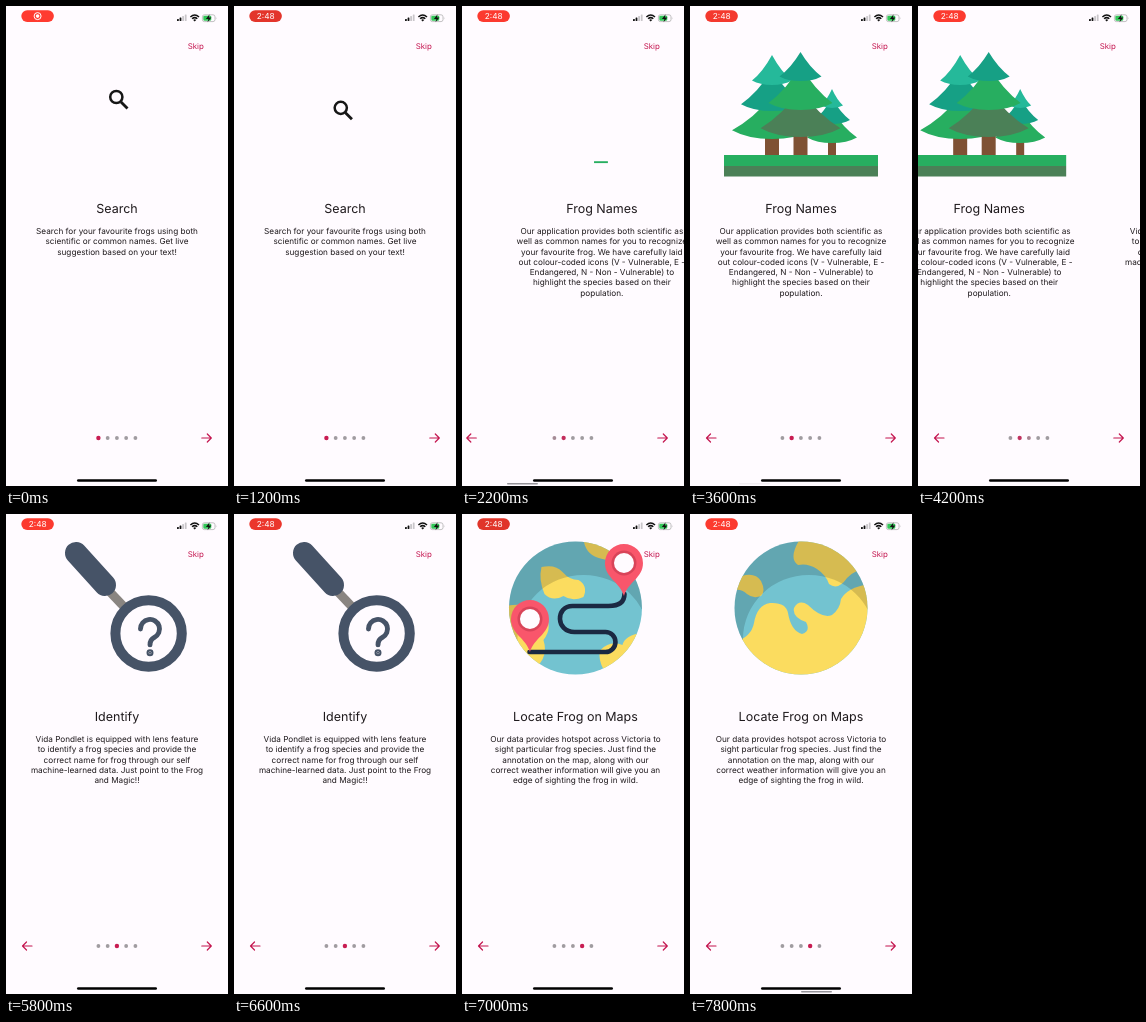
An HTML page for the animation above (8 s loop, 222 by 480 pixels).

```html
<!DOCTYPE html>
<html lang="en">
<head>
<meta charset="utf-8">
<title>Onboarding</title>
<style>
  html, body { margin: 0; width: 100%; height: 100%; overflow: hidden; background: #fffbff; }
  svg { display: block; width: 222px; height: 480px; }
  text { font-family: Inter, Roboto, sans-serif; text-anchor: middle; fill: #1f1a1d; text-rendering: geometricPrecision; }
  .title { font-size: 12.5px; }
  .body { font-size: 8.2px; }
  .line { fill: none; stroke-linecap: round; stroke-linejoin: round; }
  .arrow { stroke: #c4154f; stroke-width: 1.2; }
</style>
</head>
<body>
<svg id="stage" viewBox="0 0 222 480"></svg>
<script>
const LOOP = 8000, WIDTH = 222, SLIDE = 305;
const slides = [1920, 4090, 6698];
const thumbSpans = [[2030, 3400], [4200, 5570], [7040, 8400]];

const pages = [
  ['Search', 'Search for your favourite frogs using both|scientific or common names. Get live|suggestion based on your text!'],
  ['Frog Names', 'Our application provides both scientific as|well as common names for you to recognize|your favourite frog. We have carefully laid|out colour-coded icons (V - Vulnerable, E -|Endangered, N - Non - Vulnerable) to|highlight the species based on their|population.'],
  ['Identify', 'Vida Pondlet is equipped with lens feature|to identify a frog species and provide the|correct name for frog through our self|machine-learned data. Just point to the Frog|and Magic!!'],
  ['Locate Frog on Maps', 'Our data provides hotspot across Victoria to|sight particular frog species. Just find the|annotation on the map, along with our|correct weather information will give you an|edge of sighting the frog in wild.']
];

const clamp = v => Math.min(1, Math.max(0, v));
const ramp = (t, from, to) => clamp((t - from) / (to - from));
const smooth = k => k * k * (3 - 2 * k);
const mix = (a, b, k) => a + (b - a) * k;
const backOut = k => 1 + 2.2 * (k - 1) ** 3 + 1.2 * (k - 1) ** 2;
const scaleAt = (x, y, sx, sy = sx) => `translate(${x} ${y}) scale(${sx} ${sy}) translate(${-x} ${-y})`;

// A branch tier: pointed top, slightly hollow sides and a rounded hem.
const tier = (x, top, half, hem, color) => {
  const corner = hem - half * .22;
  return `<path fill="${color}" d="M${x} ${top}Q${x + half * .45} ${mix(top, corner, .65)} ${x + half} ${corner}
    Q${x + half * .6} ${hem} ${x} ${hem}Q${x - half * .6} ${hem} ${x - half} ${corner}
    Q${x - half * .45} ${mix(top, corner, .65)} ${x} ${top}"/>`;
};
const MINT = '#25b99a', TEAL = '#16a085', GREEN = '#27ae60', MOSS = '#4b8057';
const tree = (id, x, trunk, tiers) =>
  `<g id="${id}"><rect x="${x - trunk / 2}" y="124" width="${trunk}" height="26" fill="#7f5134"/>
  ${tiers.map(p => tier(x, ...p)).join('')}</g>`;

const pin = (id, x, y) => `<g id="${id}">
  <path fill="#f9566b" d="M${x} ${y}C${x - 4} ${y - 14} ${x - 19} ${y - 18} ${x - 19} ${y - 33}
    a19 19 0 0 1 38 0C${x + 19} ${y - 18} ${x + 4} ${y - 14} ${x} ${y}"/>
  <circle cx="${x}" cy="${y - 33}" r="12.5" fill="#d94459"/><circle cx="${x}" cy="${y - 33}" r="10" fill="#fffbff"/></g>`;

const art = [
  `<g id="search" class="line" stroke="#161616">
    <circle cx="110.3" cy="91" r="6.1" stroke-width="2.5"/><path d="M115 96L121.5 102.5" stroke-width="2.8" stroke-linecap="butt"/></g>`,

  tree('treeLeft', 82, 14, [[90, 40, 133, GREEN], [64, 31, 105, TEAL], [49, 20, 79, MINT]]) +
  tree('treeRight', 142, 8, [[104, 25, 137, GREEN], [92, 18, 118, TEAL], [83, 11, 102, MINT]]) +
  tree('treeMid', 110.5, 14, [[84, 40, 131, MOSS], [60, 32, 104, GREEN], [46, 21, 75, TEAL]]) +
  `<g id="ground"><rect x="34" y="149" width="154" height="11" fill="${GREEN}"/>
    <rect id="soil" x="34" y="160" width="154" height="10.5" fill="${MOSS}"/></g>`,

  `<g id="lens" class="line" stroke="#465367">
    <path d="M104 78L122 97" stroke="#8a8581" stroke-width="9"/><path id="handle"/>
    <circle cx="142.6" cy="119.5" r="33.2" stroke-width="10" fill="#fffbff"/>
    <g id="question"><path d="M-9 -8A9 9 0 1 1 4 0Q0 2 0 7"/><circle cy="14.5" r="1" fill="#465367"/></g></g>`,

  `<clipPath id="globeClip"><circle cx="111" cy="94" r="66.5"/></clipPath>
  <g clip-path="url(#globeClip)">
    <rect x="40" y="25" width="140" height="140" fill="#73c3d0"/>
    <g id="lands" fill="#fbdc5f">
      <g transform="translate(-150 0)">
        <path d="M77 53Q91 50 98 58T114 66Q124 72 119 83Q108 88 99 82Q88 88 80 80Q74 66 77 53"/>
        <path d="M40 92Q65 88 78 98Q90 112 79 126Q84 142 72 153L40 165Z"/>
        <path d="M180 118Q160 121 158 131Q146 126 136 136Q132 147 144 163L180 165Z"/>
        <path d="M119 25Q121 42 138 45T160 53L180 50V25Z"/>
      </g>
      <path d="M52 62Q65 58 71 67Q76 77 71 82Q63 85 57 80T46 76Z"/>
      <path d="M110 25Q98 44 108 51Q118 49 127 55T139 70Q148 77 157 64Q165 55 180 55V25Z"/>
      <path d="M40 129Q61 125 64 109Q67 91 80 89Q96 88 98 99Q101 117 112 120Q121 117 116 108Q102 103 104 94Q109 85 118 91Q132 105 142 101Q150 95 151 85Q158 73 180 70V165H40Z"/>
    </g>
    <path fill="#000" opacity=".15" fill-rule="evenodd" d="M40 25H182V165H40ZM53 125a66 64 0 1 0 132 0a66 64 0 1 0 -132 0"/>
  </g>
  <g id="route"><path class="line" stroke="#1b2942" stroke-width="4.6"
    d="M65 138H141A10 10 0 0 0 141 118H110C91 118 91 92 108 92H144Q160 92 160 80"/>
    ${pin('pinA', 65.5, 138)}${pin('pinB', 159.5, 82)}</g>`
];

const pageMarkup = ([title, body], i) => `<g id="page${i}">${art[i]}
  <text class="title" x="111" y="206.5">${title}</text>
  ${body.split('|').map((s, n) => `<text class="body" x="111" y="${228 + n * 10.25}">${s}</text>`).join('')}</g>`;

const statusBar = `
  <rect id="pill" x="15.3" y="4.2" width="32.6" height="11.8" rx="5.9"/>
  <g id="record" fill="none" stroke="#fff"><circle cx="31.6" cy="10.1" r="3.5"/><circle cx="31.6" cy="10.1" r="1.8" fill="#fff" stroke="none"/></g>
  <text id="clock" x="31.8" y="13.1" font-size="8.3" style="fill:#fff">2:48</text>
  ${[0, 1, 2, 3].map(i => `<rect x="${171 + i * 2.6}" y="${12.9 - i * 1.5}" width="1.8" height="${2.2 + i * 1.5}" rx=".5" fill="${i < 2 ? '#111' : '#c9c6ca'}"/>`).join('')}
  <g fill="none" stroke="#111" stroke-width="1.5"><path d="M184.4 11Q188.7 6.9 193 11M186.1 12.8Q188.7 10.4 191.3 12.8"/></g>
  <path d="M187.2 13.9Q188.7 12.6 190.2 13.9L188.7 15.4Z" fill="#111"/>
  <rect x="196.4" y="8.8" width="12.6" height="6.8" rx="2" fill="none" stroke="#aaa" stroke-width=".7"/>
  <rect x="197.3" y="9.7" width="8" height="5" rx="1.1" fill="#34c759"/>
  <path d="M209.9 11q1 1.2 0 2.4z" fill="#aaa"/>
  <path d="M203.6 8.2L199.9 12.9H202.4L201.5 16.2L205.4 11.4H202.8Z" fill="#111"/>`;

const controls = `
  <text x="189.8" y="42.6" font-size="7.9" style="fill:#c4154f">Skip</text>
  <path id="back" class="line arrow" d="M26 432H16.5M20.5 428L16.5 432L20.5 436"/>
  <path class="line arrow" d="M195.8 432H205.3M201.3 428L205.3 432L201.3 436"/>
  ${[0, 1, 2, 3, 4].map(i => `<circle id="dot${i}" cx="${92.4 + i * 9.25}" cy="432"/>`).join('')}
  <rect id="thumb" y="477" width="31" height="1.6" rx=".8" fill="#949298"/>
  <rect x="71" y="473.2" width="80" height="2.6" rx="1.3" fill="#000"/>`;

const stage = document.getElementById('stage');
stage.innerHTML = pages.map(pageMarkup).join('') + statusBar + controls;
const parts = Object.fromEntries([...stage.querySelectorAll('[id]')].map(el => [el.id, el]));
const set = (id, attrs) => {
  for (const name in attrs) parts[id].setAttribute(name, attrs[name]);
};

function drawStatus(t) {
  const dim = .94 + .06 * Math.cos(t * Math.PI / 1000);
  set('pill', { fill: `rgb(${255 * dim},${59 * dim},${48 * dim})` });
  set('record', { opacity: 1 - ramp(t, 700, 900) });
  set('clock', { opacity: ramp(t, 800, 1000) });
}

function drawControls(t, page) {
  set('back', { transform: `translate(${-90 * (1 - clamp(page))} 0)`, opacity: page > .5 ? 1 : 0 });
  for (let i = 0; i < 5; i++) {
    const on = clamp(1 - Math.abs(page - i));
    set('dot' + i, { r: 1.9 + .3 * on, fill: `rgb(${mix(160, 200, on)},${mix(156, 28, on)},${mix(160, 82, on)})` });
  }
  const opacity = Math.max(...thumbSpans.map(([from, to]) => ramp(t, from, from + 150) * (1 - ramp(t, to, to + 230))));
  set('thumb', { x: 18 + 31 * page, opacity });
}

function drawSearch(t) {
  const turn = t * Math.PI / 1000;
  set('search', { transform: `translate(${6 * Math.sin(turn)} ${6 * (1 - Math.cos(turn))})` });
}

function drawTrees(t) {
  const spread = mix(.09, 1, smooth(ramp(t, 2200, 2600))) * ramp(t, 2050, 2200);
  const thick = mix(.17, 1, smooth(ramp(t, 2400, 2700)));
  set('ground', { transform: scaleAt(110, 156.5, spread, thick) });
  set('soil', { opacity: ramp(t, 2250, 2400) });
  const grow = (id, x, start) => {
    const k = ramp(t, start, start + 450);
    set(id, { transform: scaleAt(x, 150, k ? Math.max(0, backOut(k)) : 0) });
  };
  grow('treeMid', 110.5, 2650);
  grow('treeLeft', 82, 2850);
  grow('treeRight', 142, 3050);
}

function drawLens(t) {
  const k = smooth(ramp(t, 5000, 5700));
  set('lens', { transform: scaleAt(142.6, 119.5, smooth(ramp(t, 4150, 4750))) });
  set('handle', {
    d: `M${76.5 - 6.5 * k} ${43.8 - 4.8 * k}L${102 - 3 * k} ${74 - 3 * k}`,
    'stroke-width': 19 + 3 * k
  });
  const size = mix(.48, 1.06, k) * ramp(t, 4700, 5000);
  set('question', {
    transform: `translate(144 ${mix(136.3, 123.5, k)}) scale(${size})`,
    'stroke-width': mix(2.4, 4.6, k)
  });
}

function drawGlobe(t) {
  set('lands', { transform: `translate(${150 * (1 - smooth(ramp(t, 7050, 7800)))} 0)` });
  const hide = ramp(t, 7040, 7190);
  set('route', { opacity: 1 - hide });
  set('pinA', { transform: scaleAt(65.5, 138, 1 - hide) });
  set('pinB', { transform: scaleAt(159.5, 82, 1 - hide) });
}

function draw(t) {
  const page = slides.reduce((sum, start) => sum + ramp(t, start, start + SLIDE) ** 1.7, 0);
  pages.forEach((_, i) => set('page' + i, { transform: `translate(${WIDTH * (i - page)} 0)` }));
  drawStatus(t);
  drawControls(t, page);
  drawSearch(t);
  drawTrees(t);
  drawLens(t);
  drawGlobe(t);
}

const began = performance.now();
function tick() {
  draw((performance.now() - began) % LOOP);
  requestAnimationFrame(tick);
}
tick();
</script>
</body>
</html>
```
